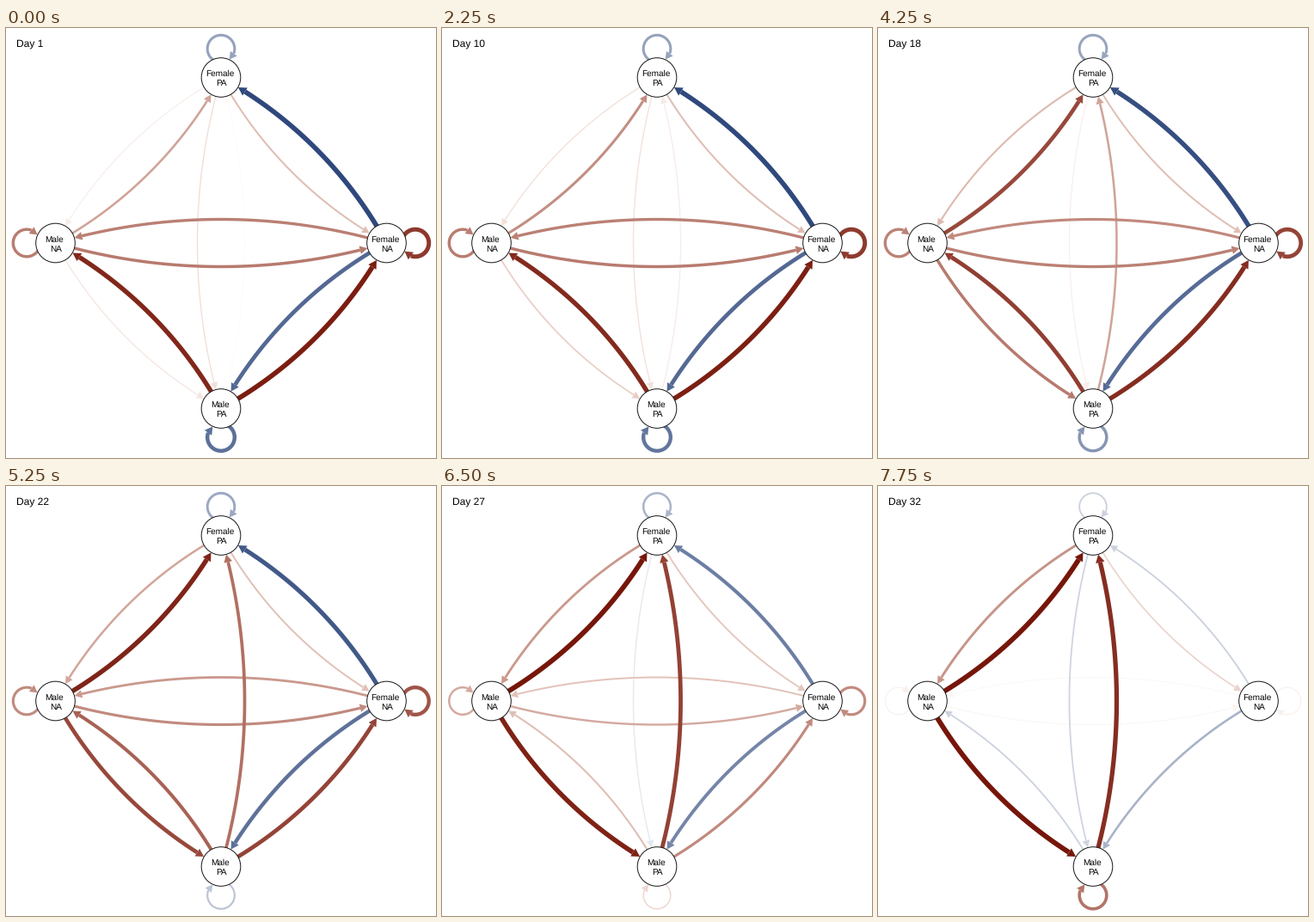
These frames come from a looping animation (500x500 px, 8000 ms). A matplotlib script:

```python
import numpy as np
import matplotlib
import matplotlib.pyplot as plt
from matplotlib.animation import FuncAnimation
from matplotlib.patches import Circle, Polygon

matplotlib.rcParams["font.family"] = "Liberation Sans"
matplotlib.rcParams["text.hinting"] = "none"

SIZE, DPI = 500, 100
PX = 72 / DPI                      # points per pixel
DAYS, INTERVAL = 32, 250
MIDDLE, RING_R = 250, 192.5
NODE_R = 23
LOOP_R, LOOP_DIST = 15.8, 33.4
HALF_ARC = 2 * np.arctan(1 / 7)    # half the opening angle of a curved edge
RED, BLUE = np.array([118, 22, 10]) / 255, np.array([40, 66, 120]) / 255
RED_FADE = np.array([1.15, 1, 0.93])   # paler reds lean towards orange

FP, FN, MP, MN = NODES = ["Female PA", "Female NA", "Male PA", "Male NA"]
# Outward angle of each node, with y pointing down
OUT = {name: (i - 1) * np.pi / 2 for i, name in enumerate(NODES)}

# Signed strength (blue above zero, red below): start, change, day of the turn
TURN_WIDTH = 4
LINKS = {
    (FN, FP): (.97, -1.93, 34),
    (FN, MP): (.80, -1.06, 34),
    (MP, FN): (-.97, 1.73, 31),
    (MP, MN): (-.93, 1.72, 29),
    (FN, MN): (-.55, .76, 29),
    (MN, FN): (-.57, 1.40, 34),
    (MN, FP): (-.38, -.72, 17),
    (FP, MN): (-.07, -.40, 17),
    (FP, FN): (-.28, .20, 33),
    (FP, MP): (-.14, .43, 25),
    (MP, FP): (-.01, -.93, 19.5),
    (MN, MP): (-.10, -.94, 18),
    (FP, FP): (.49, -.66, 34),
    (MN, MN): (-.56, 1.30, 34),
    (FN, FN): (-.85, 1.56, 32),
    (MP, MP): (.76, -1.66, 26),
}


def strength(start, change, turn, day):
    """S-shaped drift away from the starting strength."""
    value = start + change / (1 + np.exp((turn - day) / TURN_WIDTH))
    return np.clip(value, -1, 1)


def polar(centre, r, angle):
    angle = np.asarray(angle)
    return centre + r * np.stack([np.cos(angle), np.sin(angle)], axis=-1)


def node_pos(name):
    return polar(MIDDLE, RING_R, OUT[name])


def edge_arc(src, dst):
    """Centre, radius, start and end angle of the arc between two nodes."""
    a, b = node_pos(src), node_pos(dst)
    dx, dy = b - a
    chord = np.hypot(dx, dy)
    right = np.array([-dy, dx]) / chord
    r = chord / (2 * np.sin(HALF_ARC))
    centre = (a + b) / 2 - right * r * np.cos(HALF_ARC)
    top = np.arctan2(right[1], right[0])
    clip = 2 * np.arcsin(NODE_R / (2 * r))
    return centre, r, top + HALF_ARC, top - HALF_ARC + clip


def loop_arc(name):
    out = OUT[name]
    centre = polar(node_pos(name), LOOP_DIST, out)
    gap = np.arccos((LOOP_DIST**2 + LOOP_R**2 - NODE_R**2)
                    / (2 * LOOP_DIST * LOOP_R))
    return centre, LOOP_R, out - np.pi + gap - 0.15, out + np.pi - gap


class Link:
    def __init__(self, ax, src, dst, course):
        self.course = course
        self.arc = loop_arc(src) if src == dst else edge_arc(src, dst)
        self.line, = ax.plot([], [], solid_capstyle="butt")
        self.head = Polygon(np.zeros((3, 2)), closed=True, lw=0)
        ax.add_patch(self.head)

    def update(self, day):
        value = strength(*self.course, day)
        s = abs(value)
        width = 0.8 + 5 * s**1.1
        if value > 0:
            color = 1 - (1 - BLUE) * s
        else:
            color = 1 - (1 - RED) * s**RED_FADE

        centre, r, start, end = self.arc
        length, half = 7.8 + 0.3 * width, 4 + 0.25 * width
        neck = end - np.sign(end - start) * length / r
        tip, base = polar(centre, r, end), polar(centre, r, neck)
        dx, dy = (tip - base) / np.hypot(*(tip - base))
        side = half * np.array([-dy, dx])

        self.line.set_data(*polar(centre, r, np.linspace(start, neck, 80)).T)
        self.line.set(color=color, linewidth=width * PX)
        self.head.set_xy([tip, base + side, base - side])
        self.head.set_facecolor(color)
        for part in (self.line, self.head):
            part.set_zorder(2 + s)     # stronger links lie on top
            part.set_visible(s > 0.005)


fig = plt.figure(figsize=(SIZE / DPI, SIZE / DPI), dpi=DPI, facecolor="white")
ax = fig.add_axes([0, 0, 1, 1])
ax.set(xlim=(0, SIZE), ylim=(SIZE, 0))
ax.axis("off")

links = [Link(ax, src, dst, course) for (src, dst), course in LINKS.items()]

for name in NODES:
    x, y = node_pos(name)
    ax.add_patch(Circle((x, y), NODE_R - 0.2, fc="white", ec="#1a1a1a",
                        lw=1 * PX, zorder=5))
    who, mood = name.split()
    for word, dx, dy in ((who, -1.2, -1.5), (mood, 0.2, 9.7)):
        ax.text(x + dx, y + dy, word, size=10 * PX, ha="center",
                va="baseline", color="black", zorder=6)

title = ax.text(12, 22, "", size=12 * PX, va="baseline", color="black", zorder=6)


def draw(frame):
    day = frame + 1
    title.set_text(f"Day {day}")
    for link in links:
        link.update(day)


anim = FuncAnimation(fig, draw, frames=DAYS, interval=INTERVAL,
                     init_func=lambda: draw(0), repeat=True, repeat_delay=0)
plt.show()
```
